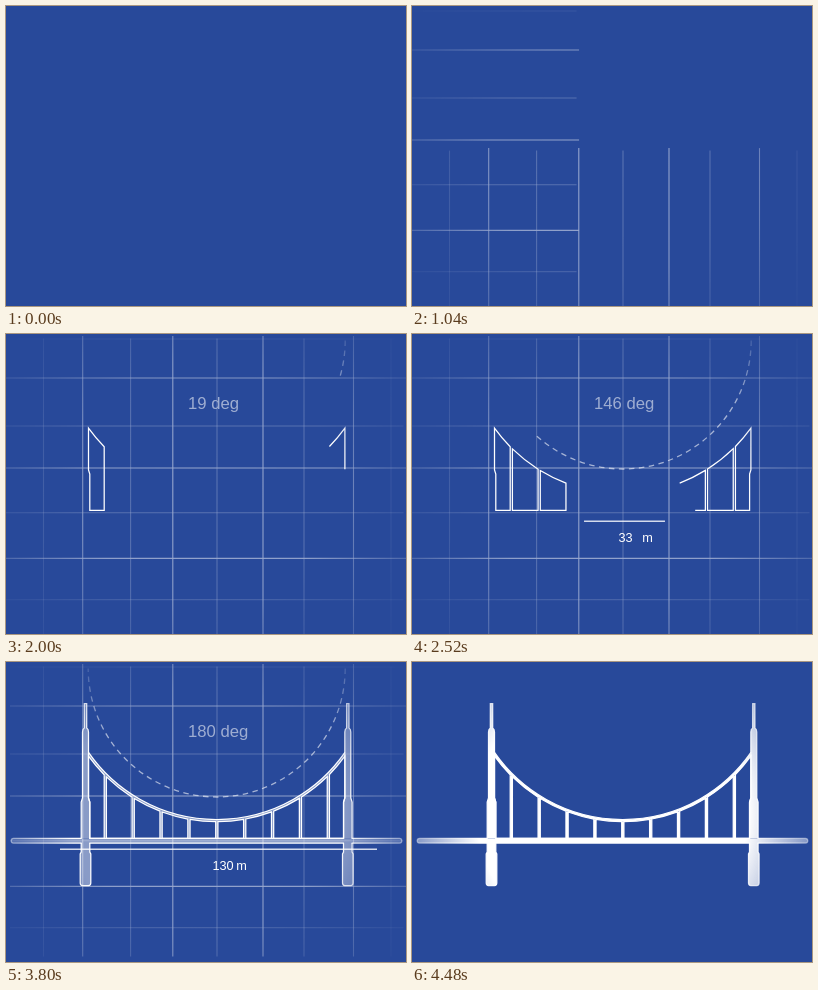
Animation of 400x300 px, one loop 4880 ms. Source, as an HTML page:

```html
<!DOCTYPE html>
<html lang="en">
<head>
<meta charset="utf-8">
<title>Bridge blueprint</title>
<style>
  html, body { margin: 0; width: 100%; height: 100%; overflow: hidden; background: #28499a; }
  svg { display: block; width: 100vw; height: 100vh; }
  text { font-family: "Liberation Sans", Arial, sans-serif; fill: #fff; }
</style>
</head>
<body>
<svg id="stage" viewBox="0 0 400 300">
  <defs>
    <radialGradient id="gridInk" gradientUnits="userSpaceOnUse" cx="200" cy="150" r="250">
      <stop offset="0" stop-color="#fff"/>
      <stop offset=".5" stop-color="#fff" stop-opacity=".9"/>
      <stop offset="1" stop-color="#fff" stop-opacity=".1"/>
    </radialGradient>
    <radialGradient id="ink" gradientUnits="userSpaceOnUse" cx="200" cy="150" r="200">
      <stop offset=".68" stop-color="#fff"/>
      <stop offset="1" stop-color="#fff" stop-opacity=".42"/>
    </radialGradient>
    <linearGradient id="arcInk" gradientUnits="userSpaceOnUse" x1="0" y1="4" x2="0" y2="70">
      <stop offset="0" stop-color="#fff" stop-opacity=".12"/>
      <stop offset="1" stop-color="#fff" stop-opacity=".58"/>
    </linearGradient>
    <clipPath id="besideTowers"></clipPath>
  </defs>
  <g id="grid" stroke="url(#gridInk)" stroke-width="1.1" opacity=".52"></g>
  <g id="notes">
    <path id="arc" fill="none" stroke="url(#arcInk)" stroke-width="1.3" stroke-dasharray="5.5 4.5"/>
    <text id="degrees" x="182" y="75" font-size="16.7"></text>
    <g id="span">
      <path id="spanLine" stroke="#fff" stroke-opacity=".8" stroke-width="1.5"/>
      <text id="metres" x="206.5" y="208" font-size="12.7"></text>
      <text x="230.2" y="208" font-size="12.7">m</text>
    </g>
  </g>
  <g id="solid" fill="url(#ink)"></g>
  <g id="outline" fill="none" stroke="url(#ink)" stroke-width="1.25"></g>
</svg>
<script>
const LOOP = 4880, STEP = 40;
const MID = 210.7, DECK = 176.4, DECK_LOW = 181, CABLE_Y = 1.5, UNDER = 158.2, OVER = 156;
const $ = id => document.getElementById(id);

function add(parent, tag, attrs) {
  const node = document.createElementNS('http://www.w3.org/2000/svg', tag);
  for (const key in attrs) node.setAttribute(key, attrs[key]);
  return parent.appendChild(node);
}

const clamp = v => Math.min(1, Math.max(0, v));
const phase = (t, from, to) => clamp((t - from) / (to - from));
const smooth = p => p * p * (3 - 2 * p);

// Cubic Bezier easing with handles (a, 0) and (b, 1).
function bezier(a, b) {
  return p => {
    let low = 0, high = 1;
    for (let i = 0; i < 24; i++) {
      const u = (low + high) / 2, v = 1 - u;
      if (3 * u * v * v * a + 3 * u * u * v * b + u * u * u < p) low = u; else high = u;
    }
    return smooth((low + high) / 2);
  };
}
const easeAcross = bezier(.63, .66), easeUp = bezier(.46, .66), easeDeck = bezier(.38, .27);

// Grid: position and strength of each line.
const rows = [[5, .2], [44, .9], [92, .45], [134, 1], [178.8, .45], [224.4, 1], [265.6, .3]];
const columns = [[37.5, .35], [76.7, .9], [124.6, .45], [166.8, 1], [211, .45], [257, 1], [298, .45], [347.5, .8], [385, .25]];
const makeLines = (list, across) => list.map(([at, strength]) => ({
  at, across,
  lag: (strength < .6 ? 2.5 : 0) + (across ? 0 : 2),
  node: add($('grid'), 'line', { 'stroke-opacity': strength })
}));
const gridLines = [...makeLines(rows, true), ...makeLines(columns, false)];

function drawGrid(t) {
  for (const { at, across, lag, node } of gridLines) {
    const ease = across ? easeAcross : easeUp;
    const size = across ? 400 : 300;
    const head = size * ease(phase(t, 80, 1780)) - lag;
    const tail = size * ease(phase(t, 3720, 4480));
    const ends = across ? [tail, at, head, at] : [at, size - tail, at, size - head];
    ['x1', 'y1', 'x2', 'y2'].forEach((key, i) => node.setAttribute(key, ends[i]));
    node.style.display = head > tail ? '' : 'none';
  }
}

// Bridge parts.
const cableAt = (x, r) => CABLE_Y + Math.sqrt(r * r - (x - MID) ** 2);
const cable = (x1, x2, r) => `M${x1} ${cableAt(x1, r)}A${r} ${r} 0 0 0 ${x2} ${cableAt(x2, r)}`;
const hangers = Array.from({ length: 9 }, (_, i) => 99.3 + 27.88 * i);
const HANGER = 1.1;
const towers = [79.5, 341.8];
const LEFT = 82.5, RIGHT = 338.9;

function towerTop(x) {
  return `M${x - 4.3} ${DECK}V140L${x - 3} 136V70Q${x - 3} 67 ${x - 1.2} 66V41.5H${x + 1.2}V66` +
    `Q${x + 3} 67 ${x + 3} 70V136L${x + 4.3} 140V${DECK}`;
}
function towerBase(x) {
  return `M${x - 4.3} ${DECK_LOW}V190L${x - 5.3} 192V221Q${x - 5.3} 223.5 ${x - 3} 223.5H${x + 3}` +
    `Q${x + 5.3} 223.5 ${x + 5.3} 221V192L${x + 4.3} 190V${DECK_LOW}`;
}
function opening(i) {
  const first = i === 0, last = i === 9;
  const x1 = first ? LEFT : hangers[i - 1] + HANGER;
  const x2 = last ? RIGHT : hangers[i] - HANGER;
  const rightSide = last ? `V136L${x2 - 1.3} 140V${DECK}` : `V${DECK}`;
  const leftSide = first ? `H${x1 + 1.3}V140L${x1} 136` : `H${x1}`;
  return cable(x1, x2, UNDER) + rightSide + leftSide + 'Z';
}
const deck = `M393.5 ${DECK}H7.5A2.3 2.3 0 0 0 7.5 ${DECK_LOW}H393.5A2.3 2.3 0 0 0 393.5 ${DECK}Z`;

const strokes = [];
function outline(d, from, to, ease = smooth) {
  const node = add($('outline'), 'path', { d, pathLength: 1 });
  strokes.push({ from, to, ease, node });
  return node;
}
for (let k = 0; k < 10; k++) {
  const start = 1800 + 120 * k;
  outline(opening(k % 2 ? 9 - (k >> 1) : k >> 1), start, start + 200);
}
outline(cable(LEFT, RIGHT, OVER), 2560, 3120);
towers.forEach((x, i) => {
  outline(towerTop(x), 2560, 3120);
  outline(towerBase(x), 2900 + 280 * i, 3140 + 280 * i);
});
outline(deck, 2560, 3520, easeDeck).setAttribute('clip-path', 'url(#besideTowers)');

// The deck's outline is open where it meets the towers.
const edges = [0, ...towers.flatMap(x => [x - 3.8, x + 3.8]), 400];
for (let i = 0; i < edges.length; i += 2) {
  add($('besideTowers'), 'rect', { x: edges[i], y: 0, width: edges[i + 1] - edges[i], height: 300 });
}

const solid = $('solid');
towers.forEach(x => [towerTop(x), towerBase(x)].forEach(d => add(solid, 'path', { d })));
add(solid, 'path', { d: deck });
add(solid, 'path', {
  d: cable(LEFT, RIGHT, (UNDER + OVER) / 2), fill: 'none', stroke: 'url(#ink)', 'stroke-width': UNDER - OVER
});
hangers.forEach(x => {
  const y = cableAt(x, UNDER);
  add(solid, 'rect', { x: x - HANGER, y, width: 2 * HANGER, height: DECK - y });
});

function drawBridge(t) {
  for (const { from, to, ease, node } of strokes) {
    const p = ease(phase(t, from, to));
    node.setAttribute('stroke-dasharray', p < 1 ? `${p} 2` : 'none');
    node.style.display = p > .001 ? '' : 'none';
  }
  solid.setAttribute('opacity', phase(t, 3540, 4000) ** 1.4);
}

function drawNotes(t) {
  const sweep = Math.PI * smooth(phase(t, 1800, 2880));
  const r = 128.5, cy = 6.5;
  $('arc').setAttribute('d', `M${MID + r} ${cy}A${r} ${r} 0 0 1 ${MID + r * Math.cos(sweep)} ${cy + r * Math.sin(sweep)}`);
  $('arc').style.display = sweep > 0 ? '' : 'none';

  $('degrees').textContent = Math.round(180 * smooth(phase(t, 1800, 2795))) + ' deg';
  $('degrees').setAttribute('opacity', .55 * phase(t, 1760, 1920));

  const half = 158.5 * phase(t, 2243, 3328);
  $('spanLine').setAttribute('d', `M${212.5 - half} 187.2H${212.5 + half}`);
  $('metres').textContent = Math.round(130 * phase(t, 2190, 3490));
  $('span').setAttribute('opacity', phase(t, 2160, 2320));
  $('notes').setAttribute('opacity', 1 - phase(t, 3820, 4080));
}

function draw(t) {
  drawGrid(t);
  drawNotes(t);
  drawBridge(t);
}

const began = performance.now();
function tick() {
  const t = Math.max(0, performance.now() - began) % LOOP;
  draw(Math.floor(t / STEP) * STEP);
  requestAnimationFrame(tick);
}
tick();
</script>
</body>
</html>
```
